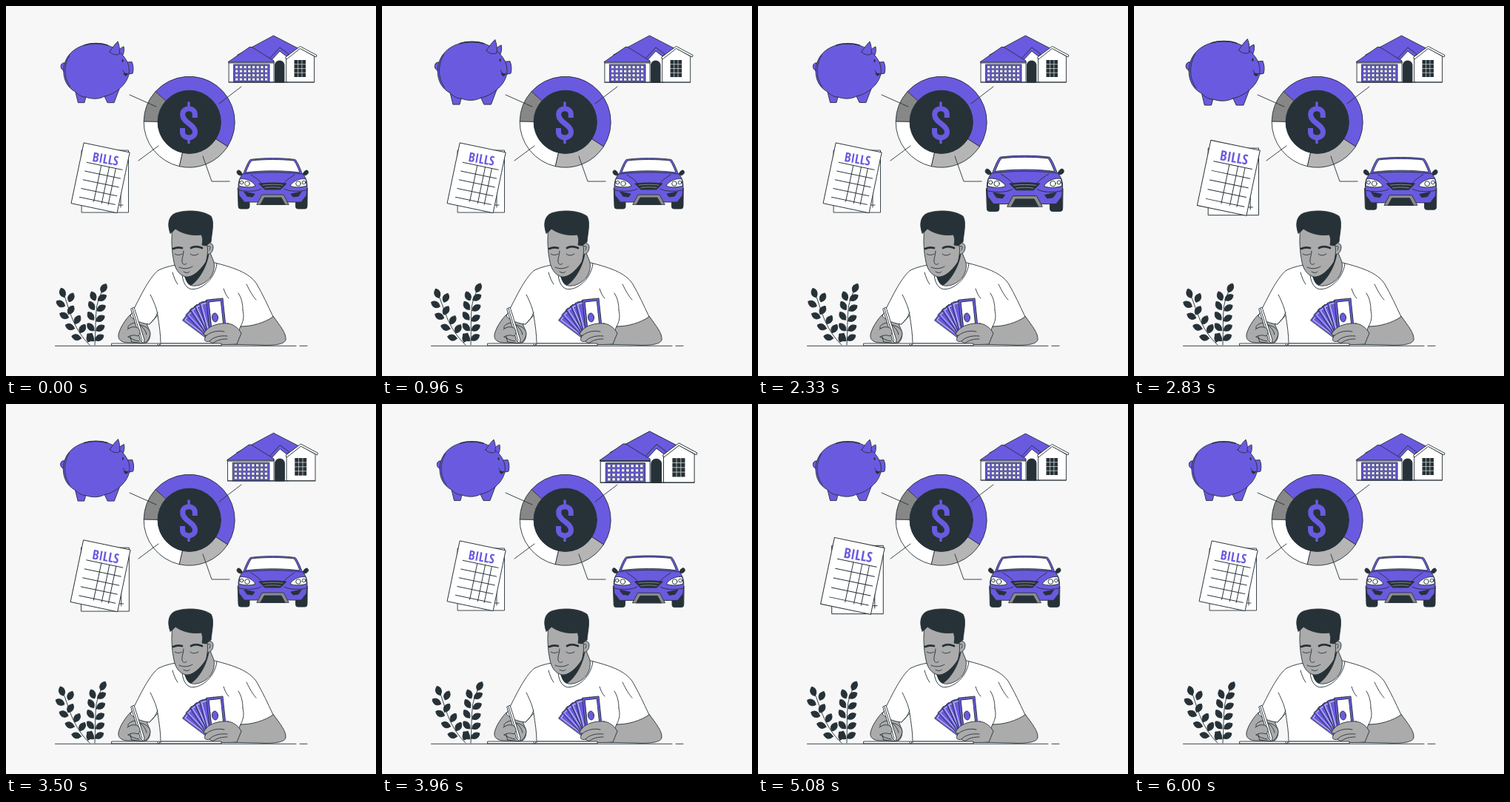
Recreate the animation shown at these times as an HTML page. Size 500 by 500 pixels, loop 6040 ms.

```html
<!DOCTYPE html>
<html lang="en">
<head>
<meta charset="utf-8">
<title>Budget planning</title>
<style>
html, body { margin: 0; width: 100%; height: 100%; overflow: hidden; background: #f7f7f7; }
#stage { display: block; width: 100vw; height: 100vh; stroke: #263238; stroke-width: .9; stroke-linejoin: round; stroke-linecap: round; }
.line { fill: none; }
.purple { fill: #6a5ae0; }
.white { fill: #fff; }
.dark { fill: #263238; }
.skin { fill: #ababab; }
.trim { fill: #8c8c8c; }
.plain { stroke: none; }
.title { font: bold 17.5px "Open Sans Condensed", "Roboto Condensed", "Open Sans", Roboto, sans-serif; font-stretch: condensed; text-anchor: middle; stroke: none; }
</style>
</head>
<body>
<svg id="stage" viewBox="0 0 500 500">
  <g id="ring"></g>
  <circle class="dark" cx="247.7" cy="156.7" r="42.5"/>
  <g class="line" style="stroke:#6a5ae0;stroke-linecap:butt">
    <path stroke-width="7" d="M255.300 151V146.500C255.300 136 238.700 136 238.700 146.500C238.700 158 255.500 160 255.500 170C255.500 180.500 238.500 180.500 238.500 170V165"/>
    <path stroke-width="3.4" d="M247 129.500V138M247 178V186"/>
  </g>
  <path class="line" d="M167 120L203 136M318 109L288 132M179 209L206 189M266 203L278 237H302"/>

  <g id="pig">
    <path class="purple" d="M80 77C73 75 72 87 79 87"/>
    <path class="purple" d="M150 66C151 60 154 57 159 55C160 60 159 65 157 68Z"/>
    <path class="purple" d="M78 88C78 65 97 51 121 51C135 51 145 55 152 62C157 65 161 70 164 76L170 75.500C172 80 172.500 86 171 91L166 92C164 100 160 106 153 112L146 130.500H137L133 122C126 126 116 126 108 123L106 130.500H97.500L94 116C83 110 78 100 78 88Z"/>
    <path class="purple" d="M140 62C143 57 147 52 151 48C153 53 154 59 153 65C149 67 144 66 140 62Z"/>
    <path class="line" d="M164 76C166 81 167 87 166 92M94 116C99 121 103 123 108 123M133 122C142 120 148 116 153 112"/>
    <path class="line" stroke-width="1.500" d="M106 53C115 50 128 50 137 53"/>
    <path class="line" d="M86 67C78 79 78 98 87 109M158 87C160 92 163 93 165 91"/>
    <path class="dark" d="M159 91c1 4 4 4 5 1z"/>
    <ellipse class="dark plain" cx="157.500" cy="74" rx="1.100" ry="2"/>
  </g>

  <g id="house">
    <path class="purple" d="M313 66L361.500 40L404 62L380 76H330Z"/>
    <path class="white" d="M356 75L370 60L381 69V103H356Z"/>
    <path class="purple" d="M357 70L370 56L382 65L379 68L370 61L358 74Z"/>
    <path class="white" d="M301.500 75H362V103H301.500Z"/>
    <path class="purple" d="M300.500 75.500L329 55.500H332L362 74V76H300.500Z"/>
    <path class="line" d="M301 77H362"/>
    <path class="purple" d="M308 79H356V103H308Z"/>
    <g id="garage" class="white" stroke-width=".5"></g>
    <path class="dark" d="M363.500 103V80C363.500 72 376 72 376 80V103Z"/>
    <path class="white" d="M379 70L397.500 57L416.500 68V103H379Z"/>
    <path class="white" d="M378 69L397.500 54.500L420 66.500L419 69L397.500 57.500L379 72Z"/>
    <path class="line" d="M301 103H416.500"/>
    <path class="dark plain" d="M389.500 73H405V96H389.500Z"/>
    <path class="line" style="stroke:#fff" stroke-width=".6" d="M394.600 73V96M399.900 73V96M389.500 78.700H405M389.500 84.500H405M389.500 90.200H405"/>
  </g>

  <g id="bills">
    <path class="white" d="M102.500 195H165.500V279H102.500Z"/>
    <path class="line" d="M149 269H158M155 246V272"/>
    <g transform="translate(105.500 185) rotate(11.800)">
      <path class="white" d="M0 0H63V83.500H0Z"/>
      <text class="title purple" x="33" y="21.500" transform="rotate(-2 33 18)">BILLS</text>
      <path id="table" class="line"/>
    </g>
  </g>

  <g id="car">
    <path class="dark" d="M313.500 246H329V271Q329 274 326 274H317Q314 274 314 271ZM407 246H391.500V271Q391.500 274 394.500 274H404Q407 274 407 271Z"/>
    <path class="dark" d="M320 229C318 221 312 220 312 225C313 229 317 229 320 229ZM400.500 229C402.500 221 408.500 220 408.500 225C407.500 229 403.500 229 400.500 229Z"/>
    <path class="purple" d="M314 244C314 235 317 230 321 226C324 218 327 211 330 207.500C346 205 375 205 391 207.500C394 211 397 218 400 226C404 230 407 235 407 244L406 256L399 265H322L315 256Z"/>
    <path class="white" d="M324 225C327 217 330 211 332 209C348 207 373 207 389 209C391 211 394 217 397 225C375 222 346 222 324 225Z"/>
    <path class="line" d="M321 227C345 224 376 224 400 227M331 228C337 232 342 235 346 240M390 228C384 232 379 235 375 240M315 249C326 251 338 251 345 247M406 249C395 251 383 251 376 247"/>
    <path class="dark" d="M342 240C353 238.500 368 238.500 379 240L371 248H350Z"/>
    <path class="line" style="stroke:#8c8c8c" d="M347 242C356 241 365 241 374 242M350 245.500C357 244.500 364 244.500 371 245.500"/>
    <path class="white" d="M316 234C322 232 333 236 337 243C331 246 321 245 315 243ZM405 234C399 232 388 236 384 243C390 246 400 245 406 243Z"/>
    <circle class="white" cx="326" cy="240" r="3.300"/><circle class="white" cx="395" cy="240" r="3.300"/>
    <circle class="white" cx="318.500" cy="238.500" r="2.300"/><circle class="white" cx="402.500" cy="238.500" r="2.300"/>
    <path class="dark" d="M322 251L336 254L333 258L326 257ZM399 251L385 254L388 258L395 257Z"/>
    <path class="trim" d="M339 268L346 255H375L382 268Z"/>
    <path class="dark" d="M344 268L349 259H372L377 268Z"/>
  </g>

  <g id="plant"></g>

  <g id="man">
    <path class="skin" d="M168 417C161 424 154 435 152 444C151 451 156 455 166 455H190C196 450 196 441 191 432L190 420Z"/>
    <path class="skin" d="M318 433L361 419C370 432 379 442 378 451C376 458 360 459 341 458L292 457L285 432Z"/>
    <path class="white" d="M241 348C228 350 216 352 206 357C192 368 178 400 168 419C174 425 183 429 194 430L205 418C207 431 209 444 209 456H306C310 447 314 440 317 433C333 433 349 428 361 420C354 405 347 390 339 376C329 360 306 353 282 347Z"/>
    <path class="line" d="M195 390C200 400 204 409 205 418M194 430C199 425 203 420 205 414M320 411C320 402 318 394 314 388M317 433C321 426 322 419 320 411M325 376C330 386 334 393 338 397M225 360C227 367 229 372 232 376M294 382C296 388 298 392 301 395"/>
    <path class="skin" d="M242 347C241 361 242 371 247 376C254 381 268 377 276 367C281 360 282 353 281 346L274 329L245 335Z"/>
    <path class="line" d="M239 350C236 362 239 378 248 382C260 386 282 372 285 348"/>
    <path class="dark" d="M241 362C242 369 245 375 250 377C259 372 271 354 274 335Z"/>
    <path class="skin" d="M269 325C272 319 280 319 280 326C280 333 274 338 269 335Z"/>
    <path class="skin" d="M225 301C223 315 224 332 227 346C229 357 235 364 243 366C252 367 262 358 270 346C274 334 273 320 268 302Z"/>
    <path class="dark" d="M222 307C218 296 219 284 229 280C243 275 266 276 277 284C282 292 278 307 277 319C274 320 272 322 271 324L265 323C266 317 266 313 264 309C250 311 237 307 229 301C227 303 225 306 222 307Z"/>
    <path class="line" stroke-width="2.700" d="M226 328C230 326 234 326 238 327M250 327C255 324 260 325 265 327"/>
    <path class="line" d="M228 335C231 337 235 337 238 335M249 335C252 338 257 337 260 335M240 331C240 337 237 342 238 346C239 350 242 350 244 348M234 353C240 356 247 355 252 352M240 359C243 361 246 361 248 359M273 325C276 323 277 326 275 330"/>

    <g id="cash"></g>
    <path class="skin" d="M300 429C288 428 275 432 270 439C266 443 267 446 271 445C266 451 269 455 275 453C280 458 292 458 312 457L318 442C313 434 307 430 300 429Z"/>
    <path class="line" d="M271 445C278 440 286 438 295 440M275 453C280 447 290 445 299 446M279 456C286 451 292 450 299 450"/>
    <path class="skin" d="M165 433C170 427 177 427 181 431C188 432 195 437 195 443C194 450 190 454 186 456L170 454Z"/>
    <path class="white" d="M169 409L173 407L187 451L186 456L182 452Z"/>
    <path class="line" d="M171 409L184 452"/>
    <path class="skin" d="M164 437C169 433 176 432 180 437C182 441 181 444 178 446C173 444 169 445 165 447"/>
    <path class="line" d="M182 432C186 435 189 439 190 444M165 447C169 450 174 452 180 453"/>
  </g>
  <path class="white" d="M143 456H204L207 458L210 456H291V459H143Z"/>
  <circle class="white" cx="206.500" cy="457" r="1.500"/>
  <path class="line" d="M66.500 459.300H392M397 459.300H407"/>
</svg>
<script>
const LOOP = 6040;
const NS = "http://www.w3.org/2000/svg";
const byId = id => document.getElementById(id);

function add(parent, tag, attrs) {
  const node = document.createElementNS(NS, tag);
  for (const key in attrs) node.setAttribute(key, attrs[key]);
  return byId(parent).appendChild(node);
}

function buildRing() {
  const point = (radius, deg) => {
    const a = deg * Math.PI / 180;
    return [247.7 + radius * Math.cos(a), 156.7 + radius * Math.sin(a)];
  };
  const sectors = [[222, 393, "#6a5ae0"], [33, 103, "#b5b5b5"], [103, 181, "#fff"], [181, 222, "#878787"]];
  for (const [from, to, fill] of sectors) {
    add("ring", "path", { fill, d: `M${point(61.5, from)}A61.5 61.5 0 0 1 ${point(61.5, to)}L${point(42.5, to)}A42.5 42.5 0 0 0 ${point(42.5, from)}Z` });
  }
}

function buildGarage() {
  for (let col = 0; col < 8; col++)
    for (let row = 0; row < 4; row++)
      add("garage", "rect", { x: 310 + col * 5.7, y: 80.8 + row * 5.5, width: 3.6, height: 3.6 });
}

function buildTable() {
  let d = "";
  for (let row = 0; row < 5; row++) d += `M9 ${25 + row * 12}H58`;
  for (const x of [29, 40, 49]) d += `M${x} 25V75`;
  byId("table").setAttribute("d", d);
}

function buildCash() {
  for (const angle of [-53, -43, -33, -24, -15]) {
    const fan = { transform: `rotate(${angle} 284 446)` };
    add("cash", "rect", { ...fan, class: "purple", x: 274, y: 397, width: 20, height: 40 });
    add("cash", "rect", { ...fan, class: "line", x: 276.5, y: 399.5, width: 15, height: 35, style: "stroke:#fff", "stroke-width": .7 });
  }
  const front = { transform: "rotate(-6 284 415)" };
  add("cash", "rect", { ...front, class: "purple", x: 273, y: 396, width: 22, height: 40 });
  add("cash", "rect", { ...front, class: "white", x: 276, y: 399, width: 16, height: 34 });
  add("cash", "ellipse", { class: "purple", cx: 282.5, cy: 421, rx: 4, ry: 6, transform: "rotate(-6 282 421)" });
}

function buildPlant() {
  add("plant", "path", { class: "line", d: "M113 458C102 448 93 433 88 420C83 408 81 398 77 390M120 458C121 440 120 423 122 406C124 396 127 389 131 381" });
  const leaves = [
    [75.5, 388, -22], [87, 394, 22], [73, 403, -65], [87, 411, 28], [78, 419, -68], [96, 424, 28],
    [86, 434, -72], [103, 436, 28], [95, 448, -80], [113, 448, 20],
    [131, 381, 25], [117, 392, -25], [129, 394, 55], [115, 405, -35], [128, 408, 55],
    [114, 419, -40], [127, 422, 55], [114, 434, -45], [127, 435, 55], [114, 448, -45], [126, 448, 55]
  ];
  for (const [x, y, angle] of leaves)
    add("plant", "path", {
      class: "dark",
      d: "M0 6.500C-5.500 3 -5 -3 .5 -6.500C5.500 -3 5 3 0 6.500Z",
      transform: `translate(${x} ${y}) rotate(${angle})`
    });
}

// Each pulse is [peak time, half duration] in ms.
const pulsing = [
  { id: "pig", x: 123, y: 89, pulses: [[650, 740], [3000, 670]] },
  { id: "house", x: 360.5, y: 71.5, pulses: [[1620, 745], [3970, 715]] },
  { id: "car", x: 360.3, y: 239.5, pulses: [[2320, 850], [4500, 740]] },
  { id: "bills", x: 127, y: 232, pulses: [[3040, 680], [5030, 670]] }
];

function pulse(time, [peak, half]) {
  const offset = Math.abs(time - peak) / half;
  return offset < 1 ? (1 + Math.cos(Math.PI * offset)) / 2 : 0;
}

function render(time) {
  for (const { id, x, y, pulses } of pulsing) {
    const scale = 1 + 0.1 * pulses.reduce((sum, p) => sum + pulse(time, p), 0);
    byId(id).setAttribute("transform", `translate(${x} ${y}) scale(${scale}) translate(${-x} ${-y})`);
  }
  const sway = 0.7 * Math.cos(time / LOOP * 6 * Math.PI);
  byId("plant").setAttribute("transform", `rotate(${sway} 113 459)`);
}

buildRing();
buildGarage();
buildTable();
buildCash();
buildPlant();

const start = performance.now();
function tick() {
  render((performance.now() - start) % LOOP);
  requestAnimationFrame(tick);
}
tick();
</script>
</body>
</html>
```
